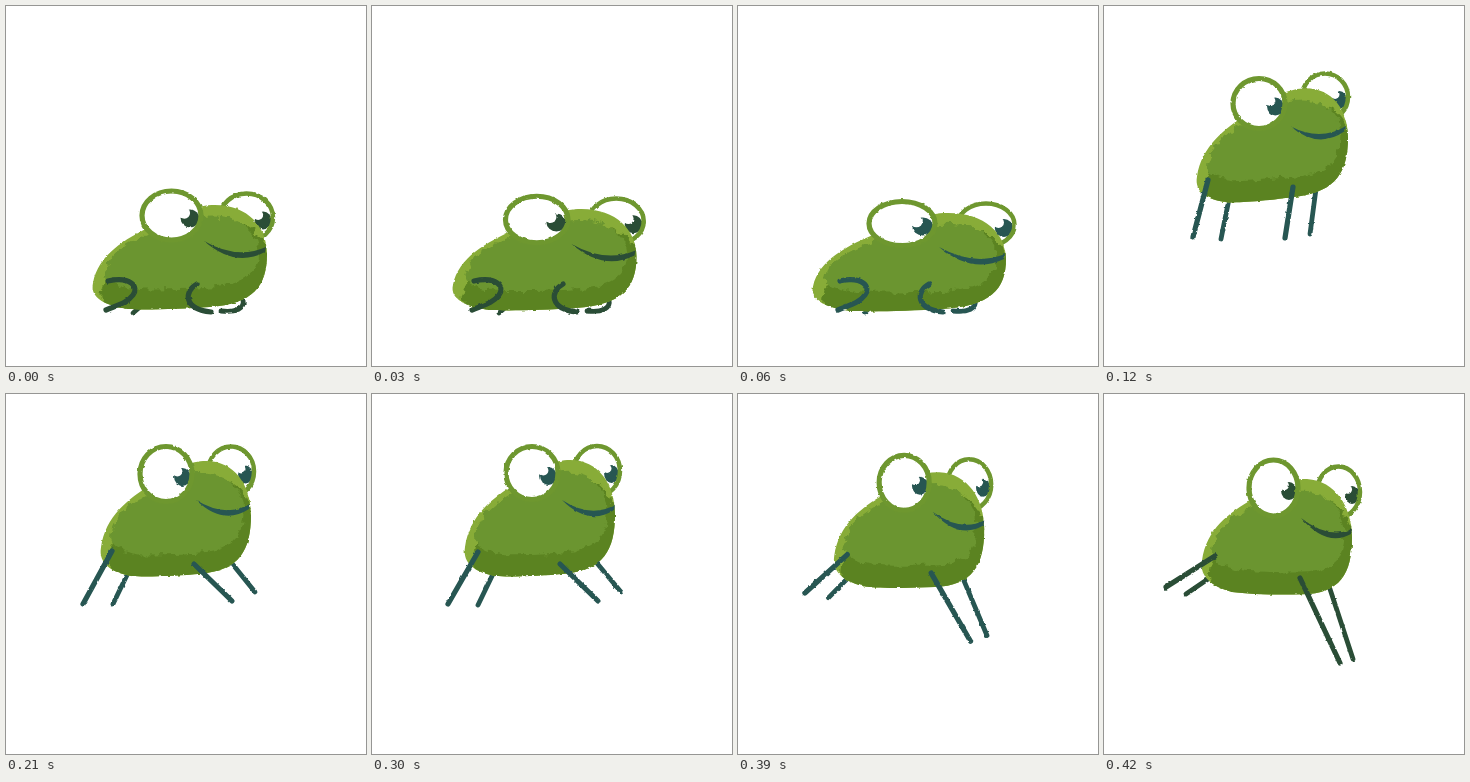
Recreate the animation shown at these times as an HTML page. Size 360x360 px, loop 480 ms.

```html
<!DOCTYPE html>
<html lang="en">
<head>
<meta charset="utf-8">
<title>Hopping frog</title>
<style>
  html, body { margin: 0; width: 100%; height: 100%; overflow: hidden; background: #fff; }
  svg { display: block; width: 100vw; height: 100vh; }
</style>
</head>
<body>
<svg viewBox="0 0 360 360">
  <defs>
    <filter id="brush" filterUnits="userSpaceOnUse" x="0" y="0" width="360" height="360" color-interpolation-filters="sRGB">
      <feTurbulence type="fractalNoise" baseFrequency=".2" numOctaves="2"/>
      <feDisplacementMap in="SourceGraphic" scale="2.5" xChannelSelector="R" yChannelSelector="G"/>
    </filter>
    <filter id="dabs" filterUnits="userSpaceOnUse" x="0" y="0" width="360" height="360" color-interpolation-filters="sRGB">
      <feTurbulence type="fractalNoise" baseFrequency=".12" numOctaves="2"/>
      <feDisplacementMap in="SourceGraphic" scale="10" xChannelSelector="R" yChannelSelector="G"/>
    </filter>
    <!-- Body outline in a unit box -->
    <path id="body" d="M0 .75C.03 .48 .18 .33 .34 .2C.5 .06 .6 0 .7 0C.89 0 1 .21 1 .47C1 .78 .92 .95 .67 .98C.5 1 .3 1.01 .2 1C.08 .97 -.02 .9 0 .75Z"/>
    <clipPath id="bodyClip"><use id="clipShape" href="#body"/></clipPath>
  </defs>
  <g id="frog" filter="url(#brush)"></g>
</svg>
<script>
const LOOP = 480;
const LIGHT = '#88ac38', MAIN = '#6b9530', SHADE = '#5b8321', RIM = '#6e972f';
const GREEN_INK = '#2a4d36', TEAL_INK = '#275652';

// box: x, y, width, height, slant; eyes: cx, cy, rx, ry; mouth: two ends;
// legs: near rear, near front, far rear, far front (folded when absent)
const poses = {
  sit: {
    ink: GREEN_INK, box: [87, 199, 174, 104, 0],
    near: [165.5, 209.5, 29.5, 24.5], far: [240.5, 211.5, 26.5, 24],
    mouth: [198, 235, 260, 243]
  },
  squash: {
    ink: TEAL_INK, box: [75, 207, 193, 98, 0],
    near: [164, 217.5, 33, 22], far: [248, 219, 28.5, 21.5],
    mouth: [201, 241, 267, 250]
  },
  rise: {
    ink: TEAL_INK, box: [93, 84, 151, 110, -8],
    near: [155, 97.5, 26, 25], far: [221, 91, 23, 23.5],
    mouth: [186, 120, 242, 122],
    legs: [[104, 174, 89, 231], [189, 181, 181, 232], [125, 193, 117, 233], [212, 183, 206, 228]]
  },
  apex: {
    ink: TEAL_INK, box: [95, 67, 150, 115, 0],
    near: [160, 80, 26, 27.5], far: [225, 77.5, 23, 25],
    mouth: [190, 106, 244, 112],
    legs: [[106, 157, 77, 210], [188, 170, 226, 207], [122, 179, 107, 210], [224, 167, 249, 198]]
  },
  hang: {
    ink: TEAL_INK, box: [93, 66, 150, 116, 0],
    near: [160, 79, 26, 26.5], far: [225, 77, 23, 25],
    mouth: [190, 106, 243, 113],
    legs: [[106, 158, 76, 210], [188, 170, 226, 207], [121, 180, 106, 211], [224, 168, 249, 198]]
  },
  fall: {
    ink: GREEN_INK, box: [98, 83, 150, 118, 10],
    near: [169.5, 94, 24.5, 28], far: [234.5, 98, 21.5, 25.5],
    mouth: [197, 124, 248, 137],
    legs: [[111, 162, 62, 193], [196, 184, 236, 269], [107, 183, 82, 200], [225, 192, 249, 265]]
  }
};

// Start time, pose, and optionally the pose it leans towards and how far
const steps = [
  [0, 'sit'], [30, 'sit', 'squash', .5], [60, 'squash'], [120, 'rise'], [210, 'apex'],
  [300, 'hang'], [330, 'hang', 'fall', .3], [360, 'hang', 'fall', .65], [420, 'fall']
];

const foldedLegs = [
  'M102 275C125 270 133 281 127 289S112 299 100 304',
  'M191 278C178 285 177 303 205 306',
  'M127 307L134 301',
  'M215 305C230 307 239 302 237 294'
];

const mix = (a, b, k) => Array.isArray(a) ? a.map((v, i) => mix(v, b[i], k)) : a + (b - a) * k;

function blend(from, to, k) {
  const pose = { ...from };
  for (const part of ['box', 'near', 'far', 'mouth', 'legs'])
    if (from[part]) pose[part] = mix(from[part], to[part], k);
  return pose;
}

function eye([cx, cy, rx, ry], ink, width) {
  const x = cx + rx * .63, y = cy + 3, r = rx * .32;
  return `<ellipse cx="${cx}" cy="${cy}" rx="${rx}" ry="${ry}" fill="#fff"/>
    <ellipse cx="${x}" cy="${y}" rx="${r}" ry="9" fill="${ink}"/>
    <circle cx="${x - r * .6}" cy="${y - 5.5}" r="${r * .6}" fill="#fff"/>
    <ellipse cx="${cx}" cy="${cy}" rx="${rx}" ry="${ry}" fill="none" stroke="${RIM}" stroke-width="${width}"/>`;
}

function mouth([x1, y1, x2, y2], ink) {
  const x = (x1 + x2) / 2, y = (y1 + y2) / 2;
  return `<path d="M${x1} ${y1}Q${x + 2} ${y + 15} ${x2} ${y2 - 2}L${x2 - 1} ${y2 + 3}Q${x} ${y + 23} ${x1} ${y1}Z" fill="${ink}"/>`;
}

function leg(pose, i) {
  const line = pose.legs && pose.legs[i];
  const d = line ? `M${line[0]} ${line[1]}L${line[2]} ${line[3]}` : foldedLegs[i];
  return `<path d="${d}" fill="none" stroke="${pose.ink}" stroke-width="${i < 2 ? 5.2 : 4.8}" stroke-linecap="round"/>`;
}

const layer = (color, matrix, inset = '') =>
  `<use href="#body" fill="${color}" transform="${matrix} ${inset}"/>`;

function draw(pose) {
  const [x, y, w, h, slant] = pose.box;
  const matrix = `matrix(${w} ${slant} 0 ${h} ${x} ${y - slant / 2})`;
  document.getElementById('clipShape').setAttribute('transform', matrix);
  document.getElementById('frog').innerHTML =
    leg(pose, 2) + leg(pose, 3) +
    eye(pose.far, pose.ink, 4.5) +
    layer(LIGHT, matrix) +
    `<g clip-path="url(#bodyClip)"><g filter="url(#dabs)">
      ${layer(SHADE, matrix, 'translate(.05 .14) scale(.97 .95)')}
      ${layer(MAIN, matrix, 'translate(.07 .11) scale(.88 .7)')}
    </g></g>` +
    eye(pose.near, pose.ink, 5.2) +
    mouth(pose.mouth, pose.ink) +
    leg(pose, 0) + leg(pose, 1);
}

const noises = document.querySelectorAll('feTurbulence');
const startTime = performance.now();
let shown = -1;

function tick() {
  const time = (performance.now() - startTime) % LOOP;
  const index = steps.filter(([start]) => start <= time).length - 1;
  if (index !== shown) {
    const [, from, to, k] = steps[index];
    noises.forEach(noise => noise.setAttribute('seed', index + 1));
    draw(to ? blend(poses[from], poses[to], k) : poses[from]);
    shown = index;
  }
  requestAnimationFrame(tick);
}
tick();
</script>
</body>
</html>
```
